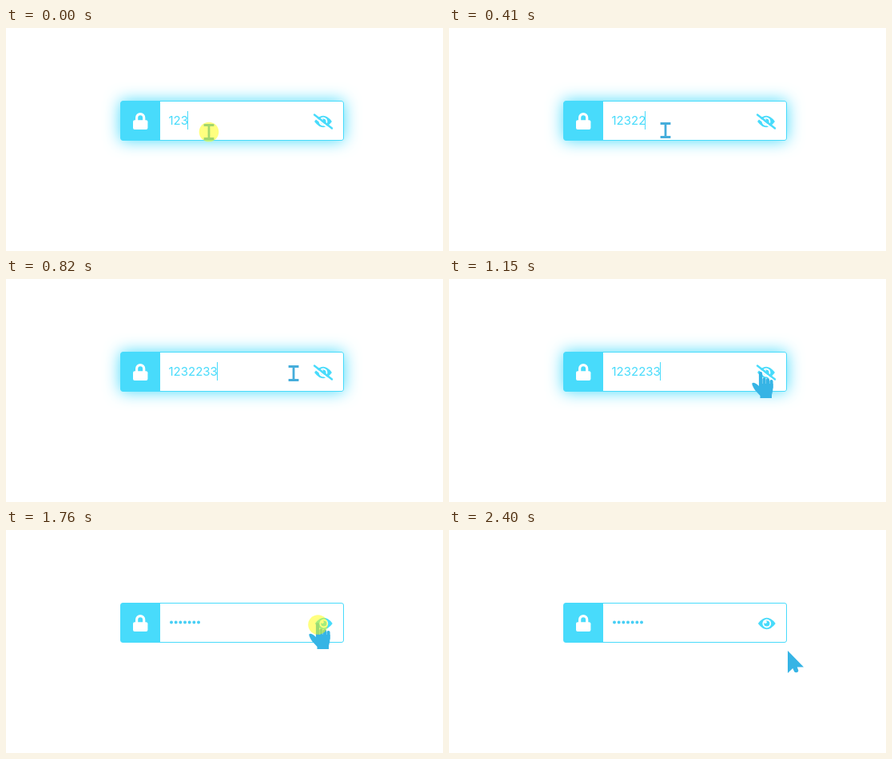
Animation of 547 by 279 pixels, one loop 2450 ms. Source, as an HTML page:

```html
<!DOCTYPE html>
<html lang="en">
<head>
<meta charset="utf-8">
<title>Password field</title>
<style>
  html, body { margin: 0; width: 100%; height: 100%; overflow: hidden; background: #fff; }
  svg { position: absolute; left: 0; top: 0; display: block; }
  .field {
    position: absolute; left: 143px; top: 91px; width: 280px; height: 50px;
    box-sizing: border-box; border: 1px solid #48dbfb; border-radius: 3px;
    background: linear-gradient(90deg, #48dbfb 49px, #fff 49px);
  }
  .focus { box-shadow: 0 0 20px #48dbfb; }
  text { font: 400 15px Inter, "Open Sans", sans-serif; }
  .line { fill: none; stroke-linecap: round; }
</style>
</head>
<body>
<div class="field" id="field"></div>
<svg width="547" height="279" viewBox="0 0 547 279" fill="#48dbfb" stroke-linejoin="round">
  <g id="lock" fill="#fff">
    <rect x="159" y="115.2" width="18.4" height="11.8" rx="2"/>
    <path fill="none" stroke="#fff" stroke-width="3.2" d="M163.6 116V112.2a4.55 4.55 0 0 1 9.1 0V116"/>
  </g>

  <text id="value" x="203.5" y="121"></text>
  <rect id="caret" y="104" width="1" height="23"/>
  <path id="dots" class="line" d="M207 115.5H242" stroke="#48cff5" stroke-width="4" stroke-dasharray="0 5.67"/>

  <g id="eye">
    <path stroke="#48dbfb" stroke-width="1.5" d="M-10 0Q0 -12.9 10 0Q0 12.9 -10 0Z"/>
    <circle r="5.4" fill="#fff"/>
    <circle r="3.6"/>
    <circle cx="-1.8" cy="-1.8" r="1.8" fill="#fff"/>
    <g id="slash" class="line">
      <path stroke="#fff" stroke-width="2.4" d="M-12.5 -6.6L9.5 10.4"/>
      <path stroke="#48dbfb" stroke-width="2.4" d="M-11 -8.5L11 8.5"/>
    </g>
  </g>

  <g id="pointer" fill="#36b4e5">
    <path id="beam" class="line" stroke="#45addb" stroke-width="2.8"
      d="M-5 -8.5H5M0 -8.5V8.5M-5 8.5H5" style="stroke-linecap: square"/>
    <g id="hand">
      <path class="line" stroke="#36b4e5" stroke-width="4.2" d="M1 2.1V20M5.5 9.3V20M10 10.2V20M14.5 12V20"/>
      <path d="M-1 15H16.6V19Q16.6 24 15 29V33H.5V30L-6 23Q-10.5 16 -9.5 14.3Q-7 12.5 -1 18Z"/>
    </g>
    <path id="arrow" d="M0 0V28L6.3 22L8.2 26.2Q9.5 28 11.8 27Q14 26 13 23.8L11.8 20.5H20Z"/>
  </g>
  <circle id="press" r="12.3" fill="#ff0" fill-opacity=".5"/>
</svg>
<script>
  const LOOP = 2450, FRAME = 41;
  const presses = [[0, 30], [1200, 1300], [1760, 1810], [2170, 2270]];
  const [focusClick, ...toggleClicks] = presses;

  const el = id => document.getElementById(id);
  const show = (id, on) => el(id).style.display = on ? '' : 'none';
  const move = (id, x, y) => el(id).setAttribute('transform', `translate(${x} ${y})`);
  const clamp = (v, lo, hi) => Math.min(hi, Math.max(lo, v));

  function ease(t, from, to) {
    const u = clamp((t - from) / (to - from), 0, 1);
    return u * u * (3 - 2 * u);
  }

  // The pointer glides to the icon, then leaves the field.
  function pointerAt(t) {
    const held = Math.floor(t / FRAME) * FRAME;
    const enter = ease(held, 220, 1070);
    const leave = ease(held, 2255, 2375);
    return [
      Math.floor(254 + 135 * enter + 35 * leave),
      Math.floor(130 - 14 * enter + 35 * leave)
    ];
  }

  function draw(t) {
    const [x, y] = pointerAt(t);
    const beam = x < 380, arrow = y > 150;
    const count = clamp(3 + Math.floor((t - 90) / 160), 3, 7);
    const focused = t < toggleClicks[0][0];
    // Each released click on the icon flips the visibility.
    const masked = toggleClicks.filter(([, end]) => t >= end).length % 2 === 1;

    el('field').classList.toggle('focus', focused);
    el('value').textContent = '1232233'.slice(0, count);
    el('caret').setAttribute('x', Math.round(198.7 + 9.3 * count));
    show('caret', focused);
    show('value', !masked);
    show('dots', masked);
    show('slash', !masked);
    move('eye', masked ? 397.8 : 397, 117);

    move('pointer', x, y);
    show('beam', beam);
    show('hand', !beam && !arrow);
    show('arrow', arrow);

    show('press', presses.some(([from, to]) => t >= from && t < to));
    move('press', beam ? x : x + 1.5, beam ? y : y + 2.5);
  }

  const start = performance.now();
  function tick() {
    draw((performance.now() - start) % LOOP);
    requestAnimationFrame(tick);
  }
  tick();
</script>
</body>
</html>
```
